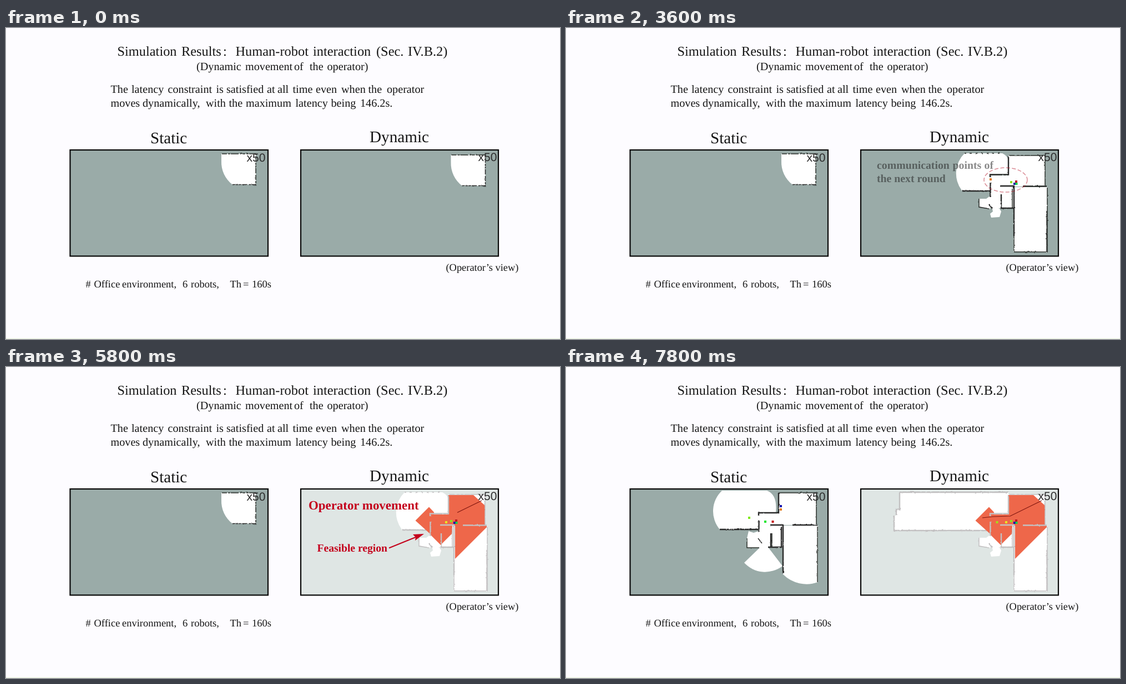
Recreate the animation shown at these times as an HTML page. Size 998x561 px, loop 8000 ms.

```html
<!DOCTYPE html>
<html lang="en">
<head>
<meta charset="utf-8">
<title>Human-robot interaction</title>
<style>
  html, body { margin: 0; width: 100%; height: 100%; overflow: hidden; background: #fdfcff; }
  svg { display: block; width: 100vw; height: 100vh; }
  text { font-family: "Liberation Serif", "Times New Roman", serif; fill: #161616; white-space: pre; text-rendering: geometricPrecision; }
  .speed { font: 21px "Liberation Sans", Arial, sans-serif; fill: #2c2c2c; }
  .bold { font-weight: bold; }
  .red { fill: #c4001c; }
  .panel { fill: #9aaba8; }
  .frame { fill: none; stroke: #080808; stroke-width: 2.2; }
  .free { fill: #fff; }
  .wall { fill: none; stroke: #292b29; stroke-width: 2.4; filter: url(#rough); }
  .thin { stroke-width: 1.5; }

  /* One loop is 8 s; 2.5% is one 200 ms step. */
  .anim { animation: 8s step-end infinite; }
  .wash { animation-name: wash; }
  .pale { animation-name: pale; }
  .note { animation-name: note; }
  .label { animation-name: label; }
  .region { animation-name: region; }
  .trail { animation-name: trail; fill: none; stroke: #7e160f; stroke-width: 1.1; stroke-dasharray: 114 200; }
  .until-map { animation-name: until-map; }
  .from-map { animation-name: from-map; }
  .room-a { animation-name: room-a; }
  .room-b { animation-name: room-b; }
  .room-c { animation-name: room-c; }
  .before-pause { animation-name: before-pause; }
  .after-pause { animation-name: after-pause; }
  .before-meet { animation-name: before-meet; }
  .after-meet { animation-name: after-meet; }

  @keyframes wash {
    0%, 47.5% { fill: #9aaba8; animation-timing-function: steps(3); }
    55%, 100% { fill: #dfe6e4; }
  }
  @keyframes pale {
    0%, 47.5% { stroke: #292b29; animation-timing-function: steps(3); }
    55%, 100% { stroke: #c3c1c2; }
  }
  @keyframes note {
    0%, 17.5% { opacity: 0; animation-timing-function: steps(3); }
    25%, 42.5% { opacity: 1; animation-timing-function: steps(2); }
    47.5%, 100% { opacity: 0; }
  }
  @keyframes label {
    0%, 47.5% { opacity: 0; animation-timing-function: steps(3); }
    55%, 72.5% { opacity: 1; animation-timing-function: steps(3); }
    80%, 100% { opacity: 0; }
  }
  @keyframes region {
    0%, 47.5% { opacity: 0; animation-timing-function: steps(3); }
    55%, 100% { opacity: 1; }
  }
  @keyframes trail {
    0%, 82.5% { stroke-dashoffset: 65; animation-timing-function: steps(6); }
    97.5%, 100% { stroke-dashoffset: 0; }
  }
  @keyframes until-map { 0% { opacity: 1; } 10%, 100% { opacity: 0; } }
  @keyframes from-map { 0% { opacity: 0; } 10%, 100% { opacity: 1; } }
  @keyframes room-a { 0% { opacity: 1; } 85%, 100% { opacity: 0; } }
  @keyframes room-b { 0% { opacity: 0; } 85% { opacity: 1; } 95%, 100% { opacity: 0; } }
  @keyframes room-c { 0% { opacity: 0; } 95%, 100% { opacity: 1; } }
  @keyframes before-pause { 0% { opacity: 1; } 47.5%, 100% { opacity: 0; } }
  @keyframes after-pause { 0% { opacity: 0; } 47.5%, 100% { opacity: 1; } }
  @keyframes before-meet { 0% { opacity: 1; } 97.5%, 100% { opacity: 0; } }
  @keyframes after-meet { 0% { opacity: 0; } 97.5%, 100% { opacity: 1; } }
</style>
</head>
<body>
<svg viewBox="0 0 998 561" preserveAspectRatio="none">
  <defs>
    <filter id="rough" filterUnits="userSpaceOnUse" x="0" y="200" width="998" height="230">
      <feTurbulence type="fractalNoise" baseFrequency=".22" numOctaves="2" seed="4"/>
      <feDisplacementMap in="SourceGraphic" scale="2.5" xChannelSelector="R" yChannelSelector="G"/>
    </filter>
    <g id="start-room">
      <path class="free" d="M388 227H450V282.5H408A51 51 0 0 1 388 240Z"/>
      <path class="wall thin" d="M389 227H450V282.5H408" stroke-dasharray="9 2 4 1 14 3"/>
    </g>
  </defs>

  <rect width="998" height="561" fill="#fdfcff"/>
  <rect y="560" width="998" height="1" fill="#e9f5d9"/>
  <g id="captions"></g>

  <!-- Static panel -->
  <rect class="panel" x="116" y="220" width="355" height="191"/>
  <use href="#start-room" class="anim before-meet"/>
  <g class="anim after-meet">
    <g class="free">
      <path d="M281 223H362Q381 230 378 262H350V293H277A51 51 0 0 1 281 223Z"/>
      <path d="M383 227H451V285H391V326H347V264H383Z"/>
      <path d="M347 296L338 299L329 296L326 309V326H348Z"/>
      <path d="M351 324L321 353A51 51 0 0 0 390 359L364 325Z"/>
      <path d="M391 286H454V388A60 60 0 0 1 391 374Z"/>
    </g>
    <path class="wall" d="M383 227V263H347V268M347.5 277V297M368 285H391V372M408 285H453M277 293H347M369 300V326M388 288V325H364"/>
    <path class="wall thin" d="M383 227H451V283M453 288V388M326 309V326H348M371 300V326M346 309L353 318"/>
    <g data-dots="330,272,#7eea12 359,279,#15e62b 372.5,279,#c31212 387,251,#1111b0 387,257,#e07a1a"></g>
  </g>
  <rect class="frame" x="115.5" y="220" width="356.5" height="191.5"/>

  <!-- Dynamic panel -->
  <rect class="panel anim wash" x="531" y="220" width="356" height="191"/>
  <g class="anim until-map"><use href="#start-room" x="413.5" y="2"/></g>
  <g class="anim from-map">
    <g class="anim room-a">
      <path class="free" d="M718 226H786Q797 231 797 242V265H764V293H713A51 51 0 0 1 718 226Z"/>
      <path class="wall anim pale" d="M714 294H764"/>
      <path class="wall thin anim pale" d="M718 226H786" stroke-dasharray="3 7"/>
    </g>
    <g class="anim room-b">
      <path class="free" d="M601 226H797V265H764V294H640Q595 290 595 256L601 259Z"/>
      <path class="wall anim pale" d="M601 258V226H797M635 294H764"/>
    </g>
    <g class="anim room-c">
      <path class="free" d="M601 226H797V265H764V295H591V268H595V257H601Z"/>
      <path class="wall anim pale" d="M591 268V295H764M601 226H797M601 226V257H595V267"/>
    </g>
    <g class="free">
      <path d="M797 230H863V286H806V325H764V266H797Z"/>
      <path d="M764 303L757 308H744V323L764 326Z"/>
      <path d="M766 318L781 326L784 331L781 341L766 342L764 335L769 331Z"/>
      <path d="M806 287H867V405L806 403Z"/>
    </g>
    <path class="anim region" fill="#ee674a" d="M737.5 277L762 252.5L771 262V266H797V231H842L863 250V286H866V289L809 346V286H804V300L783 321L764 302V301Z"/>
    <path class="wall anim pale" d="M797 231V264.5H764V269M764.5 279V305M782 285H807V375M823 285.5H866M784 300V325H806M762 318L768 326"/>
    <path class="wall thin anim pale" d="M798 230H863V284M867 288V404H807V375M866 330V404M804 290V325M744 308V323L762 326"/>
    <g class="anim region"><path class="anim trail" d="M857 241L800 269L768 270L750 272"/></g>
    <g data-dots="802,278,#8de51a 811,277,#bd1420 808,281,#1111a8 811.5,281,#12d24a"></g>
    <g class="anim before-pause" data-dots="765,273,#e27a1e"></g>
    <g class="anim after-pause" data-dots="793,280,#e9e622"></g>
    <g class="anim room-c" data-dots="776.5,280,#a4dc1c"></g>
  </g>
  <rect class="frame" x="531" y="220" width="356" height="191.5"/>

  <g class="anim note">
    <ellipse cx="792" cy="274" rx="39" ry="22" fill="none" stroke="#b5182c" stroke-width="1.5" stroke-dasharray="7 3.5"/>
    <g id="note"></g>
  </g>
  <g class="anim label">
    <path d="M690 326.5L738 307" stroke="#c4001c" stroke-width="2"/>
    <path class="red" d="M753 301L737 313L738 307L733 302Z"/>
    <g id="label"></g>
  </g>
</svg>
<script>
  const SVG = "http://www.w3.org/2000/svg";

  function add(parent, tag, attrs, content = "") {
    const node = document.createElementNS(SVG, tag);
    for (const key in attrs) node.setAttribute(key, attrs[key]);
    node.textContent = content;
    return parent.appendChild(node);
  }

  // Each part is "word@x"; the x is where that word begins.
  function line(id, size, y, parts, className = "") {
    const text = add(document.getElementById(id), "text", { y, "font-size": size, class: className });
    for (const part of parts.split("|")) {
      const [word, x] = part.split("@");
      add(text, "tspan", { x }, word);
    }
  }

  line("captions", 24.4, 50, "Simulation@200.5|Results@316|:@391|Human-robot@413.5|interaction@553|(Sec.@667|IV.B.2)@724");
  line("captions", 20.2, 76, "(Dynamic@343|movement@431|of@519|the@547|operator)@578.5");
  line("captions", 20.2, 116.5, "The@188.5|latency@226|constraint@291.5|is@378.5|satisfied@397|at@470|all@489|time@516.5|even@558|when@604|the@652.5|operator@686");
  line("captions", 20.2, 141.5, "moves@188.5|dynamically,@246|with@360|the@401.5|maximum@432|latency@521.5|being@585.5|146.2s.@638");
  line("captions", 29.1, 208, "Static@260");
  line("captions", 29.2, 206, "Dynamic@655");
  line("captions", 18.4, 438, "(Operator’s view)@792.5");
  line("captions", 18.5, 468, "#@143.5|Office@158.5|environment,@209|6@318|robots,@333|Th@403.5|=@427|160s@443");

  line("note", 19.8, 254, "communication@560|points@696.5|of@753.5", "bold");
  line("note", 19.8, 278, "the next round@560", "bold");
  line("label", 22.9, 256.5, "Operator movement@545", "bold red");
  line("label", 19.6, 333, "Feasible region@560.5", "bold red");

  const svg = document.querySelector("svg");
  add(svg, "text", { x: 433.5, y: 241, class: "speed" }, "x50");
  add(svg, "text", { x: 850.5, y: 240, class: "speed" }, "x50");

  for (const group of document.querySelectorAll("[data-dots]")) {
    for (const dot of group.dataset.dots.split(" ")) {
      const [x, y, fill] = dot.split(",");
      add(group, "rect", { x: x - 2, y: y - 2, width: 4, height: 4, fill });
    }
  }
</script>
</body>
</html>
```
